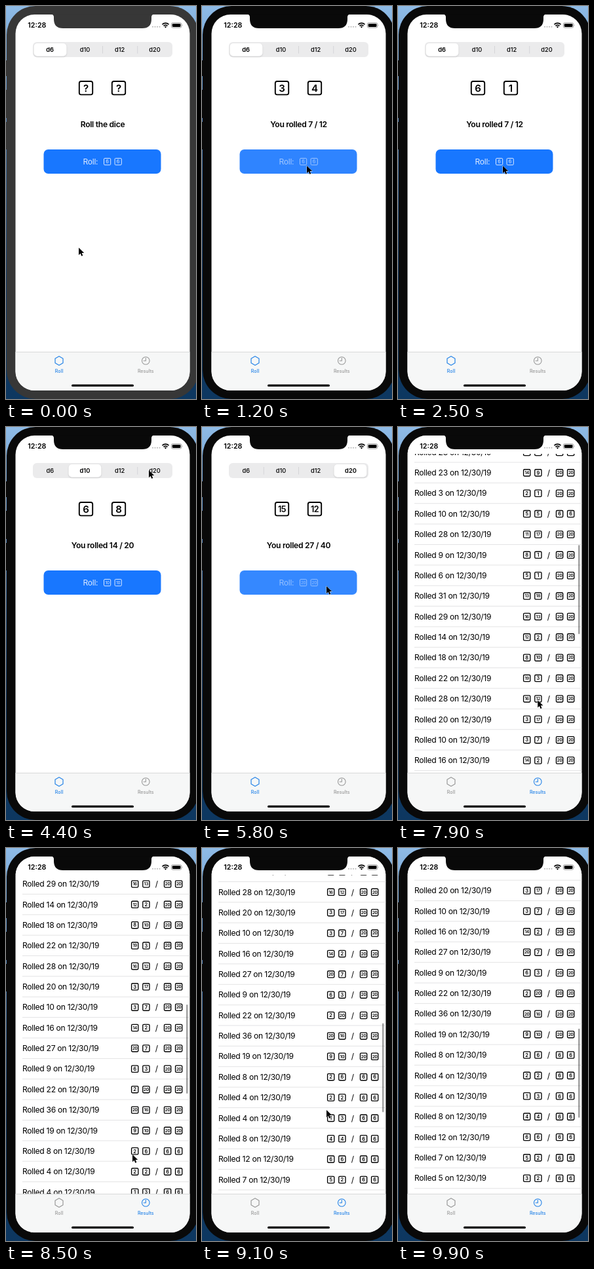
Animation, 290 px wide and 600 px high, one loop 10 s. Source, as an HTML page:

```html
<!DOCTYPE html>
<html lang="en">
<head>
<meta charset="utf-8">
<title>Dice roller</title>
<style>
html, body { margin: 0; width: 100%; height: 100%; overflow: hidden; background: #5b8fc0; }
svg { display: block; width: 290px; height: 600px; }
text { font-family: Inter, Roboto, sans-serif; }
</style>
</head>
<body>
<svg id="stage" viewBox="0 0 290 600" xmlns="http://www.w3.org/2000/svg">
  <defs>
    <linearGradient id="sky" x2="0" y2="1">
      <stop offset="0" stop-color="#8fbbe6"/>
      <stop offset=".25" stop-color="#5d8fc4"/>
      <stop offset=".7" stop-color="#143a66"/>
      <stop offset="1" stop-color="#0d3760"/>
    </linearGradient>
    <clipPath id="screen"><rect x="14.5" y="13" width="266" height="574" rx="29"/></clipPath>
    <filter id="soft" x="-20%" y="-30%" width="140%" height="180%">
      <feDropShadow dx="0" dy="1" stdDeviation="1.2" flood-opacity=".18"/>
    </filter>
  </defs>
  <rect width="290" height="600" fill="url(#sky)"/>
  <g id="body">
    <rect x="1" width="293" height="600" rx="44"/>
    <path d="M0 83h2v24H0zM0 128h2v43H0zM0 177h2v42H0z"/>
  </g>
  <g clip-path="url(#screen)">
    <rect x="14" y="12" width="267" height="576" fill="#fff"/>
    <g id="rollPage">
      <rect x="41" y="55" width="213" height="23" rx="6" fill="#ebebec"/>
      <g id="seps" stroke="#d5d5d8" stroke-width="1"></g>
      <rect id="thumb" y="57" width="49.5" height="19.5" rx="5" fill="#fff" filter="url(#soft)"/>
      <g id="tabs"></g>
      <g id="dice"></g>
      <g id="headline"></g>
      <g id="button">
        <rect x="57.5" y="219" width="179" height="37" rx="7" fill="#1877ff"/>
        <g id="label"></g>
      </g>
    </g>
    <g id="resultPage">
      <g id="list"></g>
      <rect x="14" y="12" width="267" height="29" fill="#fff"/>
      <rect id="bar" x="275" width="2.6" height="136" rx="1.3" fill="#000" opacity=".36"/>
    </g>
    <rect x="14" y="528" width="267" height="60" fill="#f6f7f7"/>
    <path d="M14 528.3h267" stroke="#cfd0d1" stroke-width=".8"/>
    <g id="rollTab">
      <path d="M81 534.8l6 3.4v6.8l-6 3.4l-6-3.4v-6.8z" fill="none" stroke-width="1.2" stroke-linejoin="round"/>
    </g>
    <g id="resultTab">
      <g fill="none" stroke-width="1.1" stroke-linecap="round">
        <circle cx="213.3" cy="541.5" r="5.8"/>
        <path d="M213.3 537.5v4.2h-3.2"/>
      </g>
    </g>
    <rect x="100" y="577.7" width="95" height="3.4" rx="1.7"/>
    <g id="status">
      <g fill="#b5b5b5">
        <circle cx="224" cy="31.8" r="1"/><circle cx="227.5" cy="31.8" r="1"/>
        <circle cx="231" cy="31.8" r="1"/><circle cx="234.5" cy="31.8" r="1"/>
      </g>
      <g fill="none" stroke="#000" stroke-width="1.6">
        <path d="M238.4 28.2a7.2 7.2 0 0 1 10.2 0"/>
        <path d="M240.5 30.4a4.2 4.2 0 0 1 6 0"/>
      </g>
      <path d="M243.5 33.6l-1.7-1.8a2.4 2.4 0 0 1 3.4 0z"/>
      <rect x="252.4" y="25.6" width="15.4" height="7.6" rx="2.2" fill="none" stroke="#888" stroke-width=".8"/>
      <rect x="253.7" y="26.9" width="12.8" height="5" rx="1.1"/>
      <path d="M268.9 28.1q1.2 1.3 0 2.6z" fill="#888"/>
    </g>
  </g>
  <path id="notch" d="M69 12.5q4 .5 4 4.5v3q0 14 14 14h121q14 0 14-14v-3q0-4 4-4.500z"/>
  <path id="cursor" d="M0 0v11.2l2.6-2.4l1.7 4l2-.9l-1.700-3.8h3.600z" fill="#000" stroke="#fff" stroke-width=".9" stroke-linejoin="round" paint-order="stroke"/>
</svg>
<script>
const $ = id => document.getElementById(id);
const LOOP = 10000, BLUE = '#2483e8', GREY = '#999';
const SIDES = [6, 10, 12, 20], ROW = 31.37, TOP = 54.2, BODY = 12.12, SEG = 53.25;

function add(parent, tag, attrs) {
  const el = document.createElementNS('http://www.w3.org/2000/svg', tag);
  for (const k in attrs) el.setAttribute(k, attrs[k]);
  return parent.appendChild(el);
}

// Text placed by the vertical centre of its capitals.
function write(parent, str, x, y, size, weight = 400, anchor = 'middle', track = 0) {
  const el = add(parent, 'text', {
    x, y: y + size * 0.364, 'font-size': size, 'font-weight': weight,
    'text-anchor': anchor, 'letter-spacing': track
  });
  el.textContent = str;
  return el;
}

function die(parent, x, y, size, line, color, weight) {
  const h = size / 2;
  add(parent, 'rect', {
    x: x - h, y: y - h, width: size, height: size, rx: size * 0.14,
    fill: 'none', stroke: color, 'stroke-width': line
  });
  const num = write(parent, '', x, y, size, weight);
  num.setAttribute('fill', color);
  return value => {
    const s = String(value), fs = size * (s.length > 1 ? 0.62 : 0.74);
    num.textContent = s;
    num.setAttribute('font-size', fs);
    num.setAttribute('y', y + fs * 0.364);
    num.setAttribute('letter-spacing', s.length > 1 ? -fs * 0.04 : 0);
  };
}

// Results, newest first; each group shares one kind of die.
const groups = [
  [20, '15 12,7 16'], [10, '6 8'], [6, '6 1,3 4,5 2'], [20, '18 4,9 11'], [12, '8 3'],
  [10, '7 2,4 10,5 9,5 6'], [12, '11 1,12 6,7 1'], [20, '14 14,14 9,2 1'], [6, '5 5'],
  [20, '11 17,8 1,5 1,13 18,16 13,12 2,8 10,19 3,16 12,3 17,3 7,14 2,20 7,6 3,2 20,20 16,9 10'],
  [6, '2 6,2 2,1 3,4 4,6 6,5 2,3 2,4 1']
];
const ABOVE = 11;
let row = -ABOVE;
for (const [n, pairs] of groups) for (const pair of pairs.split(',')) {
  const [a, b] = pair.split(' ').map(Number), y = TOP + ROW * row++;
  write($('list'), `Rolled ${a + b} on 12/30/19`, 25, y, BODY, 400, 'start', -0.29);
  [[196.7, a], [213.9, b], [246.6, n], [263.7, n]].forEach(([x, v]) =>
    die($('list'), x, y + 0.2, 10.2, 1.35, '#000', 600)(v));
  write($('list'), '/', 230, y, BODY);
  add($('list'), 'path', { d: `M25 ${y + ROW / 2}h256`, stroke: '#dcdcde', 'stroke-width': 0.8 });
}

const tabs = SIDES.map((n, i) => write($('tabs'), 'd' + n, 67.2 + SEG * i, 66.8, 9.3, 500));
const seps = [1, 2, 3].map(i => add($('seps'), 'path', { d: `M${41 + SEG * i} 61v11.500` }));
const bigDice = [122, 172].map(x => die($('dice'), x, 125.2, 20.4, 1.9, '#000', 600));
const headline = write($('headline'), '', 147.5, 181, BODY, 600, 'middle', -0.29);
write($('label'), 'Roll:', 117.5, 237.8, BODY, 400, 'start', -0.29).setAttribute('fill', '#dbe9ff');
const smallDice = [154.6, 171.2].map(x => die($('label'), x, 237.6, 10.2, 1, '#dbe9ff', 400));
write($('rollTab'), 'Roll', 81, 557.6, 7.1, 500);
write($('resultTab'), 'Results', 213.3, 557.6, 7.1, 500);
write($('status'), '12:28', 33.3, 29.2, 10.7, 600, 'start');

const clamp = v => Math.max(0, Math.min(1, v));
const smooth = u => u * u * (3 - 2 * u);

// Keys are [time, ...values].
function tween(keys, t, ease = u => u) {
  let i = 0;
  while (i < keys.length - 2 && t >= keys[i + 1][0]) i++;
  const a = keys[i], b = keys[i + 1], u = ease(clamp((t - a[0]) / (b[0] - a[0])));
  return a.slice(1).map((v, k) => v + (b[k + 1] - v) * u);
}

const pointer = [
  [300, 111, 369], [800, 160, 244], [2550, 160, 244], [2850, 120, 66], [3000, 120, 66],
  [3300, 195, 244], [3700, 195, 244], [4000, 218, 66], [4600, 218, 66], [5000, 190, 243],
  [5900, 190, 243], [6300, 213, 545], [6450, 213, 545], [6850, 235, 490], [7400, 232, 399],
  [7700, 225, 350], [8150, 197, 510], [8500, 193, 468], [8900, 190, 400]
];
const thumbKeys = [[2900, 0], [3120, 1], [4450, 1], [4700, 3]];
const scrollKeys = [
  [6800, -347], [6950, -310], [7150, -160], [7400, 0], [7700, 120], [8100, 225],
  [8500, 407], [8800, 485], [9200, 532], [9600, 549], [9900, 554]
];
const rolls = [[1000, 3, 4, 6], [1900, 6, 1, 6], [3600, 6, 8, 10], [5150, 7, 16, 20], [5700, 15, 12, 20]];

function paint(el, color) {
  el.setAttribute('fill', color);
  el.querySelectorAll('path, circle').forEach(p => p.setAttribute('stroke', color));
  const shape = el.querySelector('path');
  if (shape) shape.setAttribute('fill', 'none');
}

function drawRoll(t) {
  const [pos] = tween(thumbKeys, t, smooth);
  const pick = t < 2900 ? 0 : t < 4450 ? 1 : 3;
  $('thumb').setAttribute('x', 42.7 + pos * 53);
  tabs.forEach((el, i) => el.setAttribute('font-weight', i === pick ? 600 : 500));
  seps.forEach((el, i) => el.setAttribute('opacity', pick === i || pick === i + 1 ? 0 : 1));

  const last = rolls.filter(r => t >= r[0] + 80).pop();
  bigDice.forEach((set, i) => set(last ? last[i + 1] : '?'));
  headline.textContent = last ? `You rolled ${last[1] + last[2]} / ${last[3] * 2}` : 'Roll the dice';
  smallDice.forEach(set => set(SIDES[pick]));

  const press = Math.max(...rolls.map(([at]) => {
    const d = t - at;
    return d < 0 ? 0 : Math.min(clamp(d / 50), clamp(1 - (d - 150) / 250));
  }));
  $('button').setAttribute('opacity', 1 - 0.13 * press);
  $('label').setAttribute('opacity', 1 - 0.45 * press);
}

function drawResults(t) {
  const [s] = tween(scrollKeys, t);
  $('list').setAttribute('transform', `translate(0 ${-s})`);
  $('bar').setAttribute('y', 137 + s * 0.2506);
  $('bar').setAttribute('opacity', 0.36 * clamp((t - 6780) / 100));
}

function draw(t) {
  const results = t >= 6400, shell = t < 100 ? '#373737' : '#090909';
  $('body').setAttribute('fill', shell);
  $('notch').setAttribute('fill', shell);
  $('rollPage').style.display = results ? 'none' : '';
  $('resultPage').style.display = results ? '' : 'none';
  paint($('rollTab'), results ? GREY : BLUE);
  paint($('resultTab'), results ? BLUE : GREY);
  if (results) drawResults(t);
  else drawRoll(t);
  const [x, y] = tween(pointer, t, smooth);
  $('cursor').setAttribute('transform', `translate(${x} ${y})`);
  $('cursor').style.display = t < 9300 ? '' : 'none';
}

const start = performance.now();
function tick() {
  draw((performance.now() - start) % LOOP);
  requestAnimationFrame(tick);
}
tick();
</script>
</body>
</html>
```
